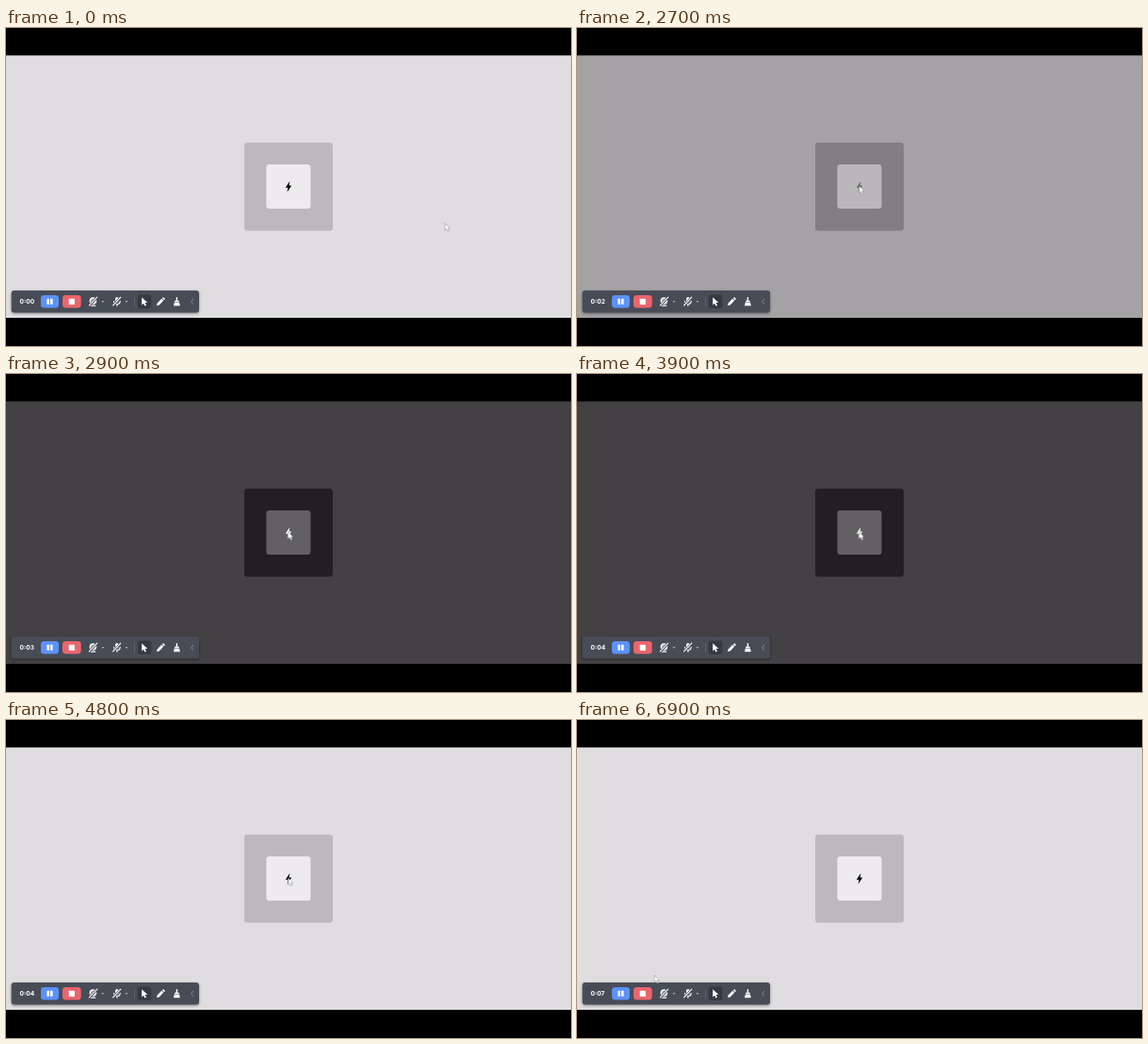
An HTML page that plays this animation: 600 px wide and 338 px high, repeating every 7 s.

```html
<!DOCTYPE html>
<html lang="en">
<head>
<meta charset="utf-8">
<title>Theme switch recording</title>
<style>
  html, body { margin: 0; width: 100%; height: 100%; overflow: hidden; background: #000; }
  svg { display: block; width: 100vw; height: 100vh; }
  text { font: 700 6.6px Inter, Roboto, sans-serif; fill: #fff; }
  .bar { fill: #484c57; filter: drop-shadow(0 1px 1.5px #0006); }
  .icon { fill: #fff; }
  .line { fill: none; stroke: #fff; stroke-width: 1.1; stroke-linecap: round; stroke-linejoin: round; }
  .cut { stroke: #484c57; stroke-width: 2.6; }
</style>
</head>
<body>
<svg viewBox="0 0 600 338">
  <rect width="600" height="338"/>
  <rect id="page" y="29.2" width="600" height="278.9"/>
  <rect id="card" x="253" y="121.7" width="94" height="93.8" rx="3.5"/>
  <rect id="tile" x="276.4" y="145" width="47.1" height="47" rx="3.2"/>
  <path id="bolt" d="M301.4 162.7L296.8 169.7H299.5L298.6 174.6L303.2 167.5H300.5Z"/>

  <rect class="bar" x="5.7" y="279" width="199.3" height="23.4" rx="3"/>
  <text id="clock" x="14.6" y="293.2"></text>
  <rect x="37" y="284" width="19" height="13.5" rx="3.4" fill="#5b92fa"/>
  <path class="icon" d="M43.4 287.8h2.6v6h-2.6zM47 287.8h2.6v6h-2.6z"/>
  <rect x="60" y="284" width="19.7" height="13.5" rx="3.4" fill="#ea656e"/>
  <rect class="icon" x="66.7" y="287.7" width="6.2" height="6.2" rx=".6"/>

  <!-- camera off -->
  <circle class="icon" cx="92.4" cy="290" r="3.8"/>
  <circle cx="92.4" cy="290" r="1.7" fill="none" stroke="#484c57" stroke-width=".7"/>
  <path class="line" d="M90 295.1h4.8"/>
  <path class="line cut" d="M89 294.4L96.8 286.2"/>
  <path class="line" d="M88.3 294.8L96.8 286.2"/>
  <!-- microphone off -->
  <rect class="icon" x="116" y="286" width="3.8" height="6" rx="1.9"/>
  <path class="line" d="M114.6 290.2a3.3 3.3 0 0 0 6.6 0M117.9 293.6v1.7"/>
  <path class="line cut" d="M114.3 294.4L121.4 286.6"/>
  <path class="line" d="M113.6 294.8L121.8 286.2"/>
  <path fill="#c9cbd1" d="M101.5 290.3h2.8l-1.4 1.5zM126.6 290.3h2.8l-1.4 1.5z"/>
  <path d="M136.5 286v10" stroke="#666a75" stroke-width=".8"/>

  <rect x="139.7" y="283.5" width="14.6" height="14.6" rx="3" fill="#363942"/>
  <path class="icon" d="M144.2 286.2v8.2l1.9-1.7 1.4 2.9 1.5-.7-1.4-2.8h2.7z"/>
  <path class="icon" d="M160 295l.6-2.6 4.6-4.6 2 2-4.6 4.6zM165.8 287.2l.8-.8q.5-.4 1 0l1 1q.4.5 0 1l-.8.8z"/>
  <path class="icon" d="M180.7 286.3q.7-.8 1.4 0v3.4h1.6v1.3h-4.6v-1.3h1.6zM178.8 291.6h5.2l.8 3.6h-6.8z"/>
  <path class="line" d="M198.7 288.2l-2 2.6 2 2.6" style="stroke:#8b8f99;stroke-width:.9"/>

  <path id="cursor" d="M0 0V7.2L1.6 5.8 2.9 8.6 4.2 8 3 5.3H5.1Z"
        fill="#fff" stroke="#858388" stroke-width=".5" stroke-linejoin="round"/>
</svg>
<script>
const LOOP = 7000, STEP = 100;
const el = id => document.getElementById(id);

const tones = {
  page: { dark: [67, 65, 67], light: [223, 221, 223] },
  card: { dark: [34, 31, 34], light: [187, 185, 187] },
  tile: { dark: [98, 96, 98], light: [237, 235, 238] },
  bolt: { dark: [255, 255, 255], light: [0, 0, 0] }
};

// Pointer stops: drift, reach for the tile, settle, leave for the toolbar.
const start = [466.2, 207.6];
const moves = [
  { from: 800, to: 1000, goal: [451, 208.5] },
  { from: 1200, to: 1940, goal: [302, 168] },
  { from: 2000, to: 2500, goal: [299.7, 168] },
  { from: 6700, to: 6900, goal: [82.2, 271.2] }
];

const mix = (a, b, p) => a.map((v, i) => v + (b[i] - v) * p);

function ease(t, from, to) {
  const u = Math.min(1, Math.max(0, (t - from) / (to - from)));
  return u * u * (3 - 2 * u);
}

function draw() {
  const t = Math.floor(performance.now() % LOOP / STEP) * STEP;
  const level = 1 - ease(t, 2600, 2840) + ease(t, 4600, 4780);
  for (const id in tones) {
    const { dark, light } = tones[id];
    el(id).setAttribute("fill", `rgb(${mix(dark, light, level).map(Math.round)})`);
  }
  const spot = moves.reduce((p, m) => mix(p, m.goal, ease(t, m.from, m.to)), start);
  el("cursor").setAttribute("transform", `translate(${spot})`);
  el("clock").textContent = "0:0" + Math.floor((t + STEP) / 1000);
  requestAnimationFrame(draw);
}
draw();
</script>
</body>
</html>
```
